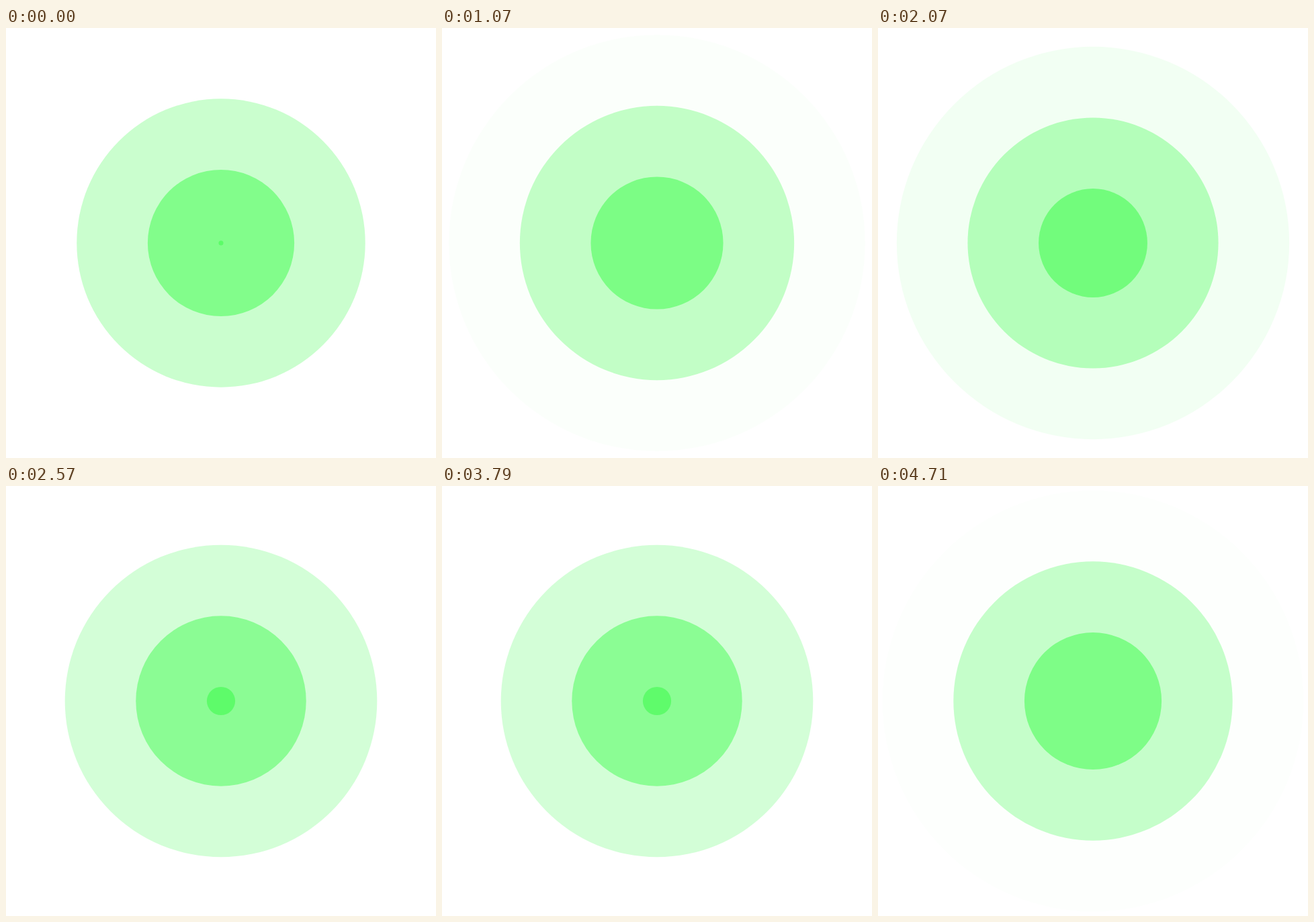
Write an HTML page that moves like this. It is 640 px wide and 640 px high and loops after 4.78 s.

```html
<!DOCTYPE html>
<html lang="en">
<head>
<meta charset="utf-8">
<title>Ripple</title>
<style>
  html, body { margin: 0; width: 100%; height: 100%; overflow: hidden; background: #fff; }
  svg { display: block; width: 100%; height: 100%; }
  circle { fill: rgb(92, 252, 104); }
</style>
</head>
<body>
<svg viewBox="0 0 640 640">
  <circle cx="320" cy="320"/>
  <circle cx="320" cy="320"/>
  <circle cx="320" cy="320"/>
</svg>
<script>
  const LOOP = 4780;      // ms
  const FPS = 14;         // shown pictures per second
  const TICKS = 25;       // ripple steps per second
  const LIFE = 90;        // steps a ring lives
  const MAX_R = 316.8;
  const rings = [...document.querySelectorAll('circle')];
  const start = performance.now();

  // The ripple advances in whole steps, shown at a lower frame rate.
  function stepAt(ms) {
    const snapped = Math.floor(ms / 10) * 10 + 5;
    const frame = Math.floor(snapped * FPS / 1000);
    return Math.floor(frame * TICKS / FPS + 1.9);
  }

  function draw() {
    const step = stepAt((performance.now() - start) % LOOP);
    rings.forEach((ring, i) => {
      const age = (step + i * LIFE / rings.length) % LIFE / LIFE;
      ring.setAttribute('r', (MAX_R * age).toFixed(2));
      ring.setAttribute('fill-opacity', (1 - age).toFixed(4));
    });
    requestAnimationFrame(draw);
  }
  draw();
</script>
</body>
</html>
```
